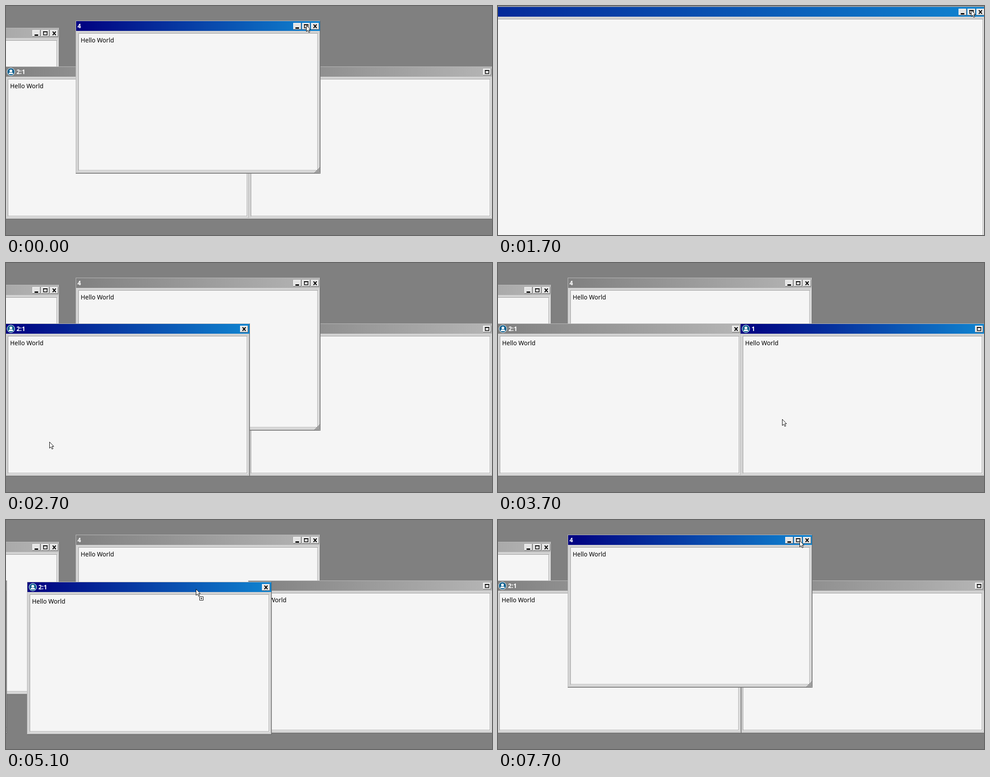
Write an HTML page that moves like this. It is 1088 px wide and 515 px high and loops after 9.1 s.

```html
<!DOCTYPE html>
<html lang="en">
<head>
<meta charset="utf-8">
<title>Desktop windows</title>
<style>
  html, body { margin: 0; width: 100%; height: 100%; overflow: hidden; background: #808080; }
  svg { display: block; width: 100vw; height: 100vh; }
  text { font: 13.6px "Noto Sans", "Open Sans", sans-serif; }
  .title { font-weight: bold; fill: #fff; }
</style>
</head>
<body>
<svg id="stage" viewBox="0 0 1088 515" preserveAspectRatio="none">
  <defs>
    <linearGradient id="on"><stop stop-color="#000080"/><stop offset="1" stop-color="#1084d0"/></linearGradient>
    <linearGradient id="off"><stop stop-color="#808080"/><stop offset="1" stop-color="#b5b5b5"/></linearGradient>
    <g id="face">
      <path fill="#e4e4e4" d="M0 0h18v15H0z"/>
      <path fill="#fff" d="M0 0h18v1H1v14H0z"/>
      <path fill="#6b6b6b" d="M17 0h1v15H0v-1h17z"/>
    </g>
    <g id="min"><use href="#face"/><path d="M5 10h8v3H5z"/></g>
    <g id="max"><use href="#face"/><path d="M5 4h8v7H5z" fill="none" stroke="#000" stroke-width="1.500"/><path d="M4 3h10v2H4z"/></g>
    <g id="close"><use href="#face"/><path d="M5.500 3.500L12.500 11.500M12.500 3.500L5.500 11.500" stroke="#000" stroke-width="2"/></g>
    <g id="user">
      <circle r="9" fill="#fff"/>
      <circle r="8" fill="#11618f"/>
      <circle cy="-2" r="3.100" fill="#fff"/>
      <path fill="#fff" d="M-5 5.200Q-5 1.600 -2 1.400Q0 2.800 2 1.400Q5 1.600 5 5.200z"/>
    </g>
    <g id="grip">
      <path fill="#c4c4c4" d="M0 13L13 0V13z"/>
      <path stroke="#555" d="M0 13L13 0M3 13L13 3M6 13L13 6M9 13L13 9"/>
    </g>
  </defs>
  <rect width="1088" height="515" fill="#808080"/>
  <g id="desk"></g>
  <g id="cursor">
    <path d="M.5 .5V14.500L3.700 11.500L6 16.500L8.300 15.500L6 10.500H10z" fill="#fff" stroke="#000"/>
    <g id="plus">
      <path d="M8.500 17.500h8v8h-8z" fill="#fff" stroke="#000"/>
      <path d="M10.500 21.500h4M12.500 19.500v4" stroke="#000"/>
    </g>
  </g>
</svg>
<script>
const LOOP = 9100, STEP = 100, W = 548, H = 344;
const NS = "http://www.w3.org/2000/svg";
const $ = id => document.getElementById(id);
const desk = $("desk");

function makeWindow(opts) {
  const g = document.createElementNS(NS, "g");
  desk.append(g);
  return { w: W, h: H, ...opts, g };
}

const all = ["close", "max", "min"];
const wins = {
  far: makeWindow({ x: -428, y: 49, title: "3", buttons: all }),
  side: makeWindow({ x: -546, y: 136, title: "2", buttons: all, grip: true }),
  left: makeWindow({ x: -2, y: 136, title: "2:1", icon: true, buttons: ["close"] }),
  right: makeWindow({ x: 542, y: 136, title: "1", icon: true, buttons: ["max"] }),
  main: makeWindow({ x: 156, y: 33, title: "4", buttons: all, grip: true })
};

const use = (id, x, y) => `<use href="#${id}" x="${x}" y="${y}"/>`;

function markup({ w, h, title, icon, buttons, grip, active }) {
  const bw = w - 13, bh = h - 36;
  const edge = w - (icon ? 22 : 21);
  return `<path fill="#d3d3d3" d="M0 0h${w}v${h}H0z"/>
    <path fill="#bababa" d="M0 0h${w}v1H1v${h - 1}H0z"/>
    <path fill="#a2a2a2" d="M${w - 2} 1h1v${h - 2}H1v-1h${w - 3}z"/>
    <path fill="#666" d="M${w - 1} 0h1v${h}H0v-1h${w - 1}z"/>
    <rect x="1" y="1" width="${w - 2}" height="22" fill="url(#${active ? "on" : "off"})"/>
    ${icon ? use("user", 13, 12) : ""}
    <text class="title" x="${icon ? 25.500 : 4}" y="17">${title}</text>
    ${buttons.map((id, i) => use(id, edge - 20 * i, 5)).join("")}
    <rect x="7.500" y="29.500" width="${bw}" height="${bh}" fill="none" stroke="#fff"/>
    <rect x="6.500" y="28.500" width="${bw}" height="${bh}" fill="#f5f5f5" stroke="#999"/>
    <text x="11.200" y="49">Hello World</text>
    ${grip ? use("grip", w - 14, h - 14) : ""}`;
}

function paint(win) {
  const key = [win.w, win.h, win.active].join();
  if (win.key !== key) {
    win.key = key;
    win.g.innerHTML = markup(win);
  }
  win.g.setAttribute("transform", `translate(${win.x} ${win.y})`);
}

// Pointer moves: start time, end time, destination
const grab = [376, 152];
const moves = [
  [500, 700, 1024, 41],
  [800, 1300, 1059, 9],
  [1900, 2500, 97, 402],
  [2700, 3300, 700, 400],
  [3500, 4200, ...grab],
  [4300, 4600, 412, 156],
  [4700, 4900, 425, 155],
  [5100, 5500, 385, 154],
  [6500, 7400, 675, 46]
];

function pointer(t) {
  let x = 672, y = 43;
  for (const [from, to, tx, ty] of moves) {
    const k = Math.min(1, Math.max(0, (t - from) / (to - from)));
    const e = k * k * (3 - 2 * k);
    x += (tx - x) * e;
    y += (ty - y) * e;
  }
  return [Math.round(x), Math.round(y)];
}

// A click raises a window and gives it focus
const clicks = [[0, "main"], [2700, "left"], [3400, "right"], [4300, "left"], [7000, "main"]];
let raised;

function setStack(t) {
  const past = clicks.filter(c => c[0] <= t);
  if (past.length === raised) return;
  raised = past.length;
  const order = Object.keys(wins);
  for (const [, name] of past) order.push(...order.splice(order.indexOf(name), 1));
  order.forEach(name => {
    desk.append(wins[name].g);
    wins[name].active = name === order.at(-1);
  });
}

function render(now) {
  const t = Math.floor(now % LOOP / STEP) * STEP;
  const [cx, cy] = pointer(t);
  setStack(t);

  const big = t >= 200 && t < 1800;
  Object.assign(wins.main, big ? { x: -500, y: 1, w: 1592, h: 720 } : { x: 156, y: 33, w: W, h: H });

  // The dragged window follows the pointer until it snaps to its neighbour
  const dx = cx - grab[0], dy = cy - grab[1];
  const free = t >= 4800 && t < 5500 && dx > 38;
  wins.left.x = free ? dx - 2 : t < 6200 ? -2 : -3;
  wins.left.y = free ? 136 + dy : 136;

  Object.values(wins).forEach(paint);
  $("cursor").setAttribute("transform", `translate(${cx} ${cy})`);
  $("plus").style.display = t >= 4300 && t < 6600 ? "" : "none";
}

const start = performance.now();
function tick() {
  render(performance.now() - start);
  requestAnimationFrame(tick);
}
tick();
</script>
</body>
</html>
```
